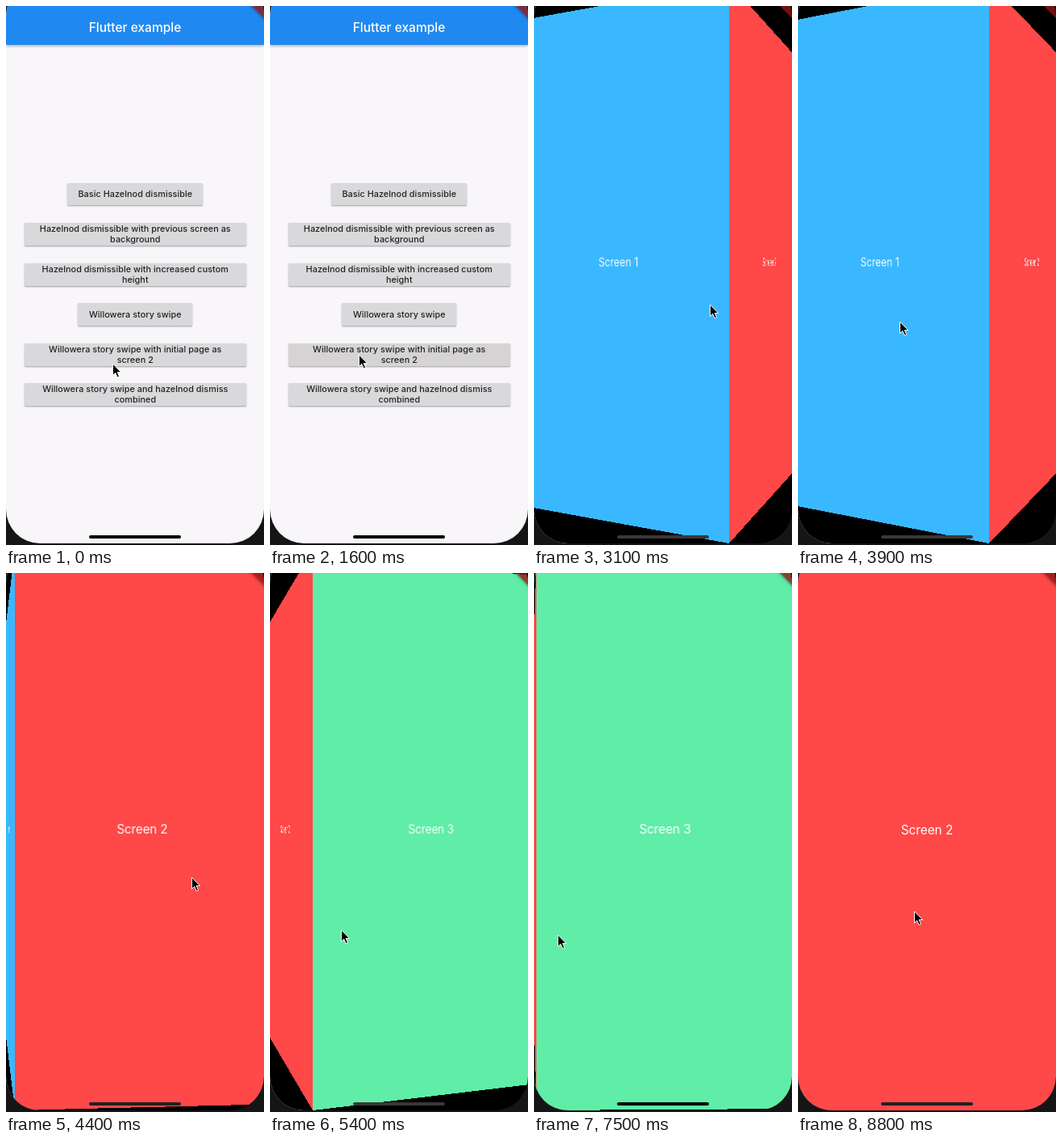
An HTML page for the animation above (8.9 s loop, 320 by 666 pixels).

```html
<!DOCTYPE html>
<html lang="en">
<head>
<meta charset="utf-8">
<title>Flutter example</title>
<style>
  html, body { margin: 0; width: 100%; height: 100%; overflow: hidden; background: #151515; }
  body { position: relative; font-family: Inter, Roboto, sans-serif; }
  #phone {
    position: absolute; left: 0; top: -28.6px; width: 320px; height: 692.6px;
    border-radius: 42px; overflow: hidden; background: #000;
  }
  #home, #pager, .page { position: absolute; left: 0; top: 0; width: 320px; height: 692.6px; }
  #home { background: #f8f6f9; }
  #pager { background: #000; overflow: hidden; }
  .bar {
    position: absolute; left: 0; top: 0; width: 320px; height: 76.6px; background: #2089f1;
    box-shadow: 0 1.5px 3.5px rgba(0, 0, 0, .35);
  }
  .bar span {
    position: absolute; left: 0; right: 0; top: 45.6px; line-height: 20px;
    text-align: center; font-size: 15.5px; font-weight: 500; color: #fff;
  }
  .btn {
    position: absolute; height: 27.8px; border-radius: 1.6px; background: #d9d8da;
    display: flex; align-items: center; justify-content: center; text-align: center;
    white-space: pre; font-size: 10.8px; line-height: 13px; font-weight: 500;
    letter-spacing: .06px; color: #222;
    box-shadow: 0 1.2px 1.6px rgba(0, 0, 0, .3), 0 0 1.5px rgba(0, 0, 0, .12);
  }
  .page {
    display: flex; align-items: center; justify-content: center;
    color: #fff; font-size: 15.3px; line-height: 20px;
  }
  #pill {
    position: absolute; left: 103px; top: 682.6px; width: 114px; height: 4px;
    border-radius: 2px;
  }
  svg { position: absolute; left: 0; top: 0; overflow: visible; }
  #banner { top: 28.6px; }
  #shade { filter: blur(2.3px); }
</style>
</head>
<body>
<div id="phone">
  <div id="home"><div class="bar"><span>Flutter example</span></div></div>
  <div id="pager"></div>
  <svg id="banner" width="320" height="40">
    <path id="shade" d="M290-15H303L335 17V30Z" fill-opacity=".5"/>
    <path d="M290-15H303L335 17V30Z" fill="#b71c1c" fill-opacity=".63"/>
  </svg>
  <div id="pill"></div>
</div>
<svg width="320" height="666">
  <path id="cursor" d="M0 0V14.4L3.3 11.4L5.7 16.8L8.1 15.8L5.8 10.5H10.3Z"
    fill="#000" stroke="#fff" stroke-width="1" stroke-linejoin="round"/>
</svg>
<script>
const LOOP = 8900, STEP = 100, W = 320, DEPTH = 773, SWIPE = 900;
const $ = id => document.getElementById(id);
const progress = (t, from, to) => Math.min(1, Math.max(0, (t - from) / (to - from)));
const smooth = u => u * u * (3 - 2 * u);
const mix = (a, b, u) => a + (b - a) * u;

function add(parent, cls, text, style) {
  const el = document.createElement('div');
  el.className = cls;
  el.textContent = text;
  Object.assign(el.style, style);
  return parent.appendChild(el);
}

const WIDE = 275.2;
const buttons = [
  [168, 'Basic Hazelnod dismissible'],
  [WIDE, 'Hazelnod dismissible with previous screen as\nbackground'],
  [WIDE, 'Hazelnod dismissible with increased custom\nheight'],
  [142, 'Willowera story swipe'],
  [WIDE, 'Willowera story swipe with initial page as\nscreen 2'],
  [WIDE, 'Willowera story swipe and hazelnod dismiss\ncombined']
].map(([w, text], i) => add($('home'), 'btn', text, {
  left: 160.3 - w / 2 + 'px', top: 247.2 + i * 49.55 + 'px', width: w + 'px'
}));

const pages = ['#3ab8ff', '#ff4848', '#5feda8'].map((background, i) =>
  add($('pager'), 'page', 'Screen ' + (i + 1), { background }));

const swipes = [
  { at: 2490, by: -1 }, { at: 3600, by: 1 }, { at: 4732, by: 1 }, { at: 7450, by: -1 }
];

function pageAt(t) {
  const turned = swipes.reduce((p, s) => p + s.by * smooth(progress(t, s.at, s.at + SWIPE)), 1);
  // Pulling past the last page springs back.
  return turned + .1015 * Math.sin(Math.PI * progress(t, 6550, 7400)) ** 2;
}

const moves = [
  { from: 0, to: 600, x: 103, y: 430 },
  { from: 700, to: 1000, x: 111, y: 431 },
  { from: 2000, to: 2500, x: 80, y: 386 },
  { from: 2500, to: 3100, x: 219, y: 369 },
  { from: 3600, to: 4000, x: 110, y: 394 },
  { from: 4000, to: 4400, x: 231, y: 376 },
  { from: 4800, to: 5400, x: 89, y: 441 },
  { from: 5700, to: 6400, x: 264, y: 398 },
  { from: 6500, to: 6900, x: 27, y: 448 },
  { from: 7400, to: 8400, x: 145, y: 418 }
];

function cursorAt(t) {
  return moves.reduce((c, m) => {
    const u = smooth(progress(t, m.from, m.to));
    return { x: mix(c.x, m.x, u), y: mix(c.y, m.y, u) };
  }, { x: 133, y: 442 });
}

// Pages turn like the sides of a cube, hinged on the shared edge.
function drawPages(p) {
  pages.forEach((el, i) => {
    const t = i - p, turn = p > 2 ? 0 : 90 * t;
    el.style.visibility = Math.abs(t) < .999 ? 'inherit' : 'hidden';
    el.style.left = t * W + 'px';
    el.style.transformOrigin = t < 0 ? '100% 50%' : '0 50%';
    el.style.transform = Math.abs(turn) < .01 ? 'none' : `perspective(${DEPTH}px) rotateY(${turn}deg)`;
  });
}

function drawPill(p, opened) {
  const gap = p > 2 ? 0 : Math.abs(p - Math.round(p));
  const rest = opened && Math.abs(p - 1) < .1 ? 34 : 0;
  const v = Math.max(rest, 60 * Math.min(1, gap / .16));
  $('pill').style.background = `rgb(${v}, ${v * .9}, ${v * .9})`;
}

function draw(t) {
  const u = progress(t, 1640, 2090);
  const push = 1 - (1 - u) ** 4;
  const p = pageAt(t), c = cursorAt(t);
  $('home').style.transform = `translateX(${-push * W / 3}px)`;
  $('pager').style.transform = `translateX(${(1 - push) * W}px)`;
  $('pager').style.visibility = u > 0 ? 'visible' : 'hidden';
  buttons[4].style.background = t >= 1600 ? '#d6d3d4' : '#d9d8da';
  drawPages(p);
  drawPill(p, u > .3);
  $('cursor').setAttribute('transform', `translate(${c.x - .6} ${c.y})`);
}

const start = performance.now();
function tick() {
  const t = (performance.now() - start) % LOOP;
  draw(Math.floor(t / STEP) * STEP);
  requestAnimationFrame(tick);
}
tick();
</script>
</body>
</html>
```
